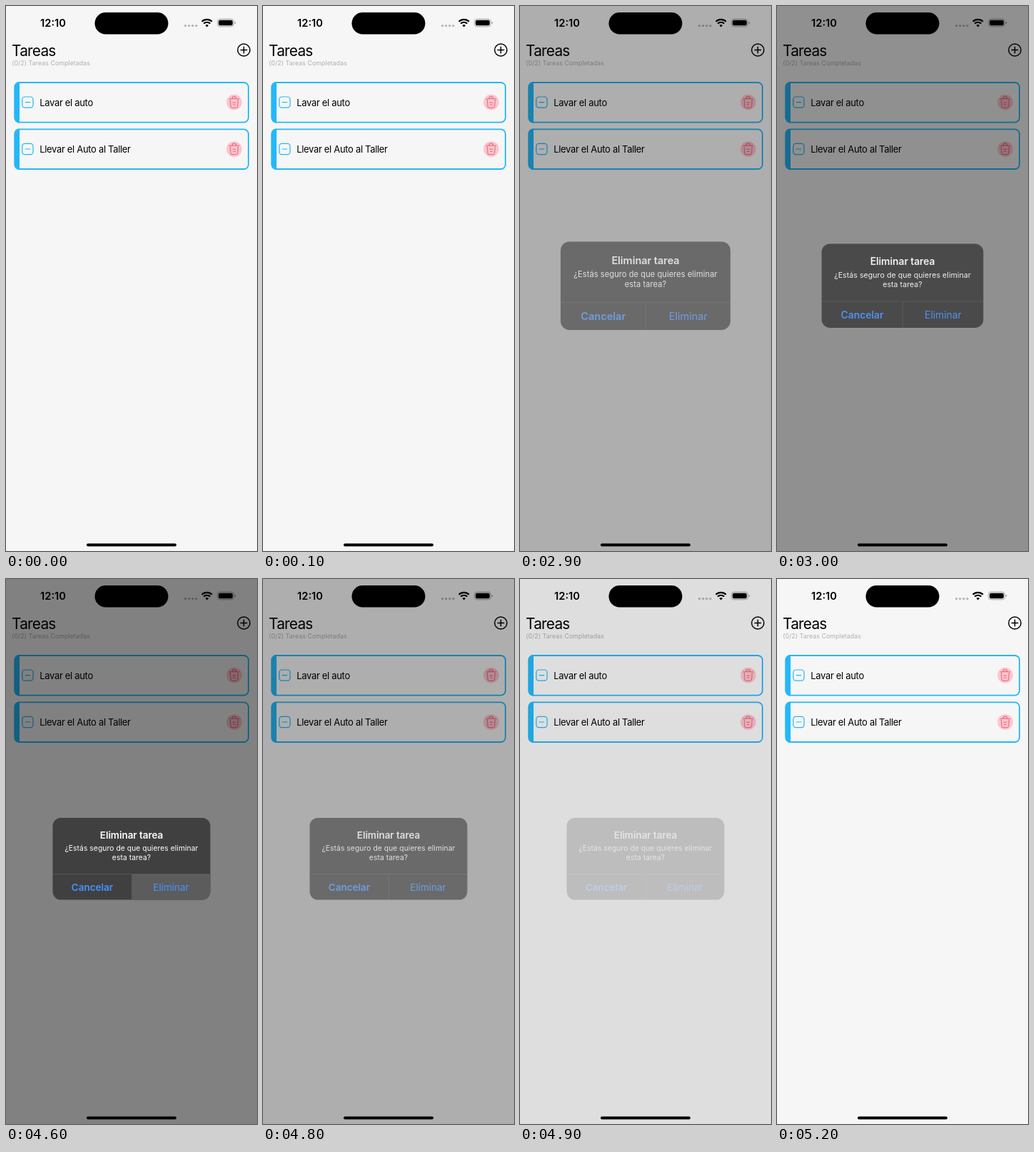
An HTML page for the animation above (5300 ms loop, 352 by 762 pixels).

```html
<!DOCTYPE html>
<html lang="es">
<head>
<meta charset="utf-8">
<title>Tareas</title>
<style>
  html, body { margin: 0; width: 100%; height: 100%; overflow: hidden; background: #f6f6f6; }
  svg { display: block; width: 100%; height: 100%; }
  text { font-family: Inter, "Liberation Sans", sans-serif; }
  .mid { text-anchor: middle; }
  .semi { font-weight: 600; }
  .heading { font-size: 20.8px; letter-spacing: -.75px; }
  .count { font-size: 8.7px; letter-spacing: .12px; fill: #aeaeae; }
  .task { font-size: 13px; letter-spacing: -.32px; }
  .label { font-size: 13.5px; }
  .note { font-size: 10.3px; letter-spacing: .06px; }
  .line { fill: none; stroke-linecap: round; stroke-linejoin: round; }
</style>
</head>
<body>
<svg viewBox="0 0 352 762">
  <defs>
    <g id="card">
      <rect x="12.4" y="1" width="327.6" height="55.6" rx="6.5" fill="none" stroke="#24b8f8" stroke-width="1.8"/>
      <path d="M19 .1V57.5H18.5a7 7 0 0 1-7-7V7.1a7 7 0 0 1 7-7z" fill="#24b8f8"/>
      <g class="line" stroke="#24b8f8" stroke-width="1.2">
        <rect x="22.8" y="21" width="15.2" height="15.2" rx="3.6"/>
        <path d="M27.2 28.6h6.4"/>
      </g>
      <circle cx="320" cy="28.6" r="10.8" fill="#fcc5cd"/>
      <g class="line" stroke="#e9607a" stroke-width="1.3" transform="translate(310.6 19.2) scale(.78)">
        <path d="M3 6Q12 5 21 6M8.5 5L9 2.9Q9.2 2 10.5 2h3Q14.8 2 15 2.9L15.5 5"/>
        <path d="M5 8l.8 11.4Q6 22 8.8 22h6.4Q18 22 18.2 19.4L19 8"/>
        <path d="M9.5 12.5h5M10.3 16.5h3.4"/>
      </g>
    </g>
  </defs>

  <rect width="352" height="762" fill="#f6f6f6"/>
  <text class="heading" x="8" y="69.8">Tareas</text>
  <text class="count" x="8.2" y="83.3">(0/2) Tareas Completadas</text>
  <g class="line" stroke="#000" stroke-width="1.5">
    <circle cx="333.5" cy="61.5" r="8.6"/>
    <path d="M329.2 61.5h8.6M333.5 57.2v8.6"/>
  </g>
  <use href="#card" y="106"/>
  <text class="task" x="47.2" y="139.5">Lavar el auto</text>
  <use href="#card" y="171.4"/>
  <text class="task" x="47.2" y="205">Llevar el Auto al Taller</text>

  <text class="mid semi" x="66" y="29.3" font-size="14.7">12:10</text>
  <g fill="#b4b4b4">
    <circle cx="251.6" cy="27.6" r="1.7"/>
    <circle cx="256.7" cy="27.6" r="1.7"/>
    <circle cx="261.8" cy="27.6" r="1.7"/>
    <circle cx="266.9" cy="27.6" r="1.7"/>
  </g>
  <g fill="none" stroke="#000" stroke-width="2.1">
    <path d="M274.7 21.8a10 10 0 0 1 14.2 0M277.2 24.6a6.5 6.5 0 0 1 9.2 0"/>
    <path d="M281.8 29.5l-2.3-2.4a3.3 3.3 0 0 1 4.6 0z" fill="#000" stroke="none"/>
  </g>
  <rect x="296.5" y="18.2" width="23" height="10.6" rx="3.5" fill="none" stroke="#a2a2a2"/>
  <rect x="298" y="19.7" width="20" height="7.6" rx="2.2"/>
  <path d="M320.8 21.7q1.6 .5 1.6 1.8t-1.6 1.8z" fill="#a2a2a2"/>

  <rect id="dim" width="352" height="762" opacity="0"/>
  <rect x="124.5" y="9" width="103" height="30.4" rx="15.2"/>
  <rect x="113" y="751.4" width="126" height="4" rx="2"/>

  <g id="alert" opacity="0">
    <rect x="65.5" y="333.9" width="221" height="114.6" rx="11.5" fill="#404040"/>
    <path id="press" d="M176.5 412.5H286.5V437a11.5 11.5 0 0 1-11.5 11.5H176.5z" fill="#5c5c5c" opacity="0"/>
    <path d="M65.5 412.5h221M176.3 412.5v36" stroke="#5d5d5d" stroke-width=".7"/>
    <g class="mid" fill="#fff">
      <text class="label semi" x="176" y="363" letter-spacing="-.06">Eliminar tarea</text>
      <text class="note" x="176" y="380.1">¿Estás seguro de que quieres eliminar</text>
      <text class="note" x="176" y="393">esta tarea?</text>
    </g>
    <g class="mid label" fill="#4692ff">
      <text class="semi" x="121" y="435.9">Cancelar</text>
      <text x="231.5" y="435.9">Eliminar</text>
    </g>
  </g>
</svg>
<script>
  const LOOP = 5300, STEP = 100, DIM = .48;
  const OPEN = 2900, PRESS = 4600, CLOSE = 4800;
  const SPRING = [.61, .87, .96, .99, 1];
  const [dim, alertBox, press] = ['dim', 'alert', 'press'].map(id => document.getElementById(id));

  // Spring progress, advancing in hard 100 ms steps
  const spring = ms => ms < 0 ? 0 : SPRING[Math.min(4, Math.floor(ms / STEP))];

  function draw(t) {
    const shown = spring(t - OPEN);
    const alpha = t < CLOSE ? shown : 1 - (spring(t - CLOSE) - .61) / .39 * .61 - .39;
    const scale = 1.2 - .2 * shown;
    dim.setAttribute('opacity', DIM * alpha);
    alertBox.setAttribute('opacity', alpha);
    alertBox.setAttribute('transform', `translate(176 391.2) scale(${scale}) translate(-176 -391.2)`);
    press.setAttribute('opacity', t >= PRESS && t < CLOSE ? 1 : 0);
  }

  const start = performance.now();
  function tick() {
    draw((performance.now() - start) % LOOP);
    requestAnimationFrame(tick);
  }
  tick();
</script>
</body>
</html>
```
